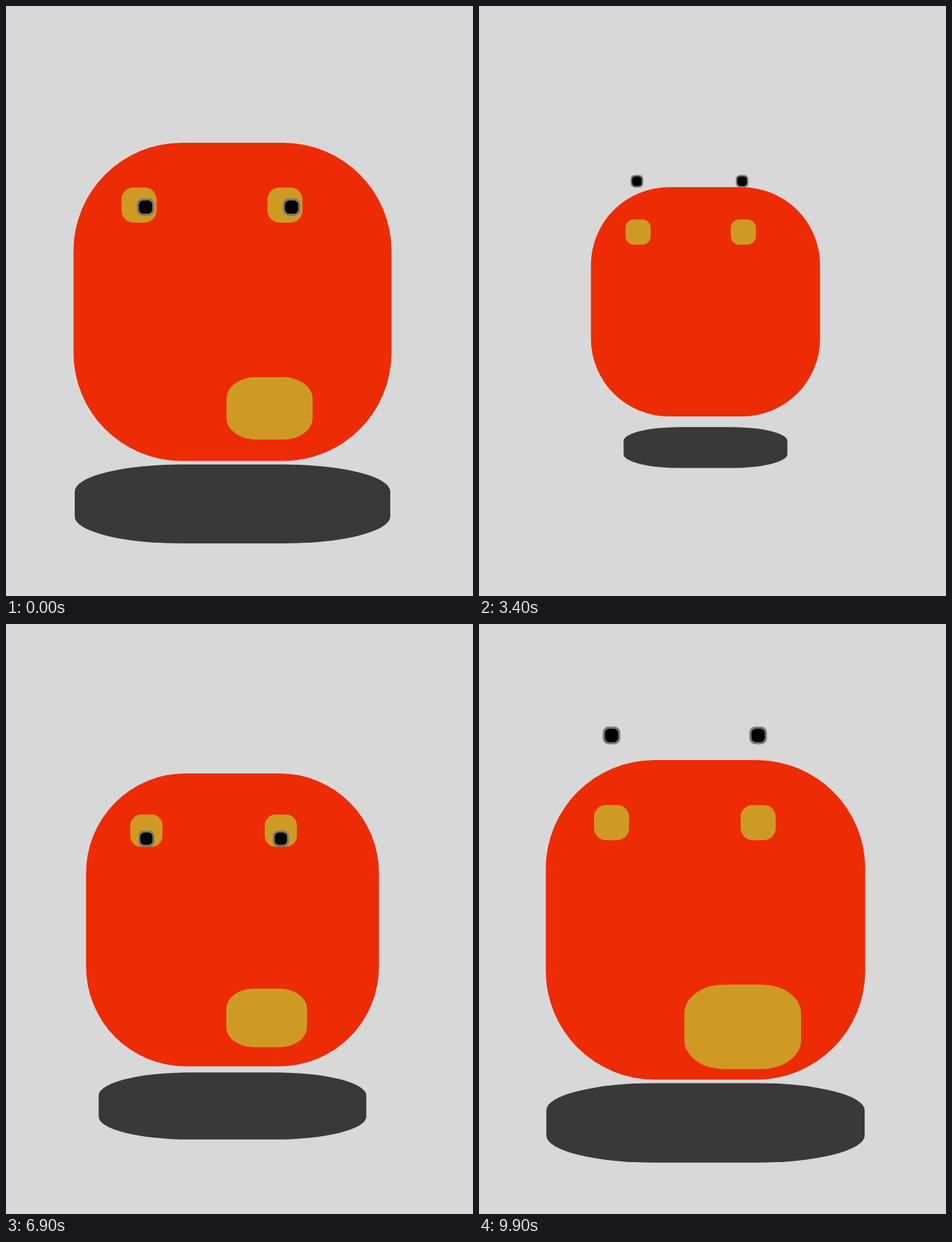
An HTML page with a canvas that plays this animation: 666 px wide and 841 px high, repeating every 10000 ms.

```html
<!DOCTYPE html>
<html lang="en">
<head>
<meta charset="utf-8">
<title>Bobbing head</title>
<style>
  html, body { margin: 0; width: 100%; height: 100%; overflow: hidden; background: #d8d8d8; }
  canvas { display: block; }
</style>
</head>
<body>
<canvas id="stage" width="666" height="841"></canvas>
<script>
const ctx = document.getElementById('stage').getContext('2d');
const LOOP = 10000, STEP = 100, LEAD = 210;
const SIZE = 457, CX = 323, CY = 421.7, ROUND = 0.34;
const RED = '#ed2b05', GOLD = '#cf9a23', DARK = '#393939', GREY = '#777', BLACK = '#000';

// Each row: time in ms, then the values reached there.
const BOB = [[0, 1], [5000, 0.7], [10000, 1]];
const GAZE = [
  [0, 12.5, 0], [1200, 0, 12.5], [1800, -12.5, 0], [3000, -12.5, 0],
  [4200, 0, -125], [5400, 0, 0], [6000, 0, 0]
];
const MOUTH = [
  [0, 123.8], [2100, 158.4], [3400, 0], [5400, 0],
  [6900, 126], [7800, 119], [9900, 167], [10000, 167]
];

// The CSS "ease" curve, cubic-bezier(.25, .1, .25, 1).
function ease(x) {
  let lo = 0, hi = 1, s = 0.5;
  for (let i = 0; i < 24; i++) {
    s = (lo + hi) / 2;
    if (0.75 * s * (1 - s) + s ** 3 < x) lo = s; else hi = s;
  }
  return 0.3 * s * (1 - s) ** 2 + 3 * s * s * (1 - s) + s ** 3;
}

function sample(rows, time) {
  const t = time % rows[rows.length - 1][0];
  const i = rows.findIndex(row => row[0] > t);
  const a = rows[i - 1], b = rows[i];
  const p = ease((t - a[0]) / (b[0] - a[0]));
  return a.slice(1).map((v, k) => v + (b[k + 1] - v) * p);
}

// Rounded box around a centre, with radii in proportion to its sides.
function box(x, y, w, h, color) {
  if (w <= 0) return;
  ctx.fillStyle = color;
  ctx.beginPath();
  ctx.roundRect(x - w / 2, y - h / 2, w, h, { x: w * ROUND, y: h * ROUND });
  ctx.fill();
}

function draw(t) {
  const time = t + LEAD;
  const [scale] = sample(BOB, time);
  const [gx, gy] = sample(GAZE, time);
  const [mouth] = sample(MOUTH, t);

  ctx.setTransform(1, 0, 0, 1, 0, 0);
  ctx.fillStyle = '#d8d8d8';
  ctx.fillRect(0, 0, 666, 841);
  ctx.translate(CX, CY);
  ctx.scale(scale, scale);

  // The shadow shrinks with the head and once more on its own.
  box(0, 290.4, SIZE * scale, SIZE * scale / 4, DARK);
  box(0, 0, SIZE, SIZE, RED);
  box(53.3, 153, mouth, mouth * 0.7235, GOLD);
  for (const x of [-134.4, 75.4]) {
    box(x, -139.1, 50.3, 50.3, GOLD);
    box(x + gx, -139.1 + gy, 25.1, 25.1, GREY);
    box(x + gx, -139.1 + gy, 19.1, 19.1, BLACK);
  }
}

function tick() {
  const frame = Math.floor((performance.now() + 5) / STEP);
  draw(frame * STEP % LOOP);
  requestAnimationFrame(tick);
}
tick();
</script>
</body>
</html>
```
